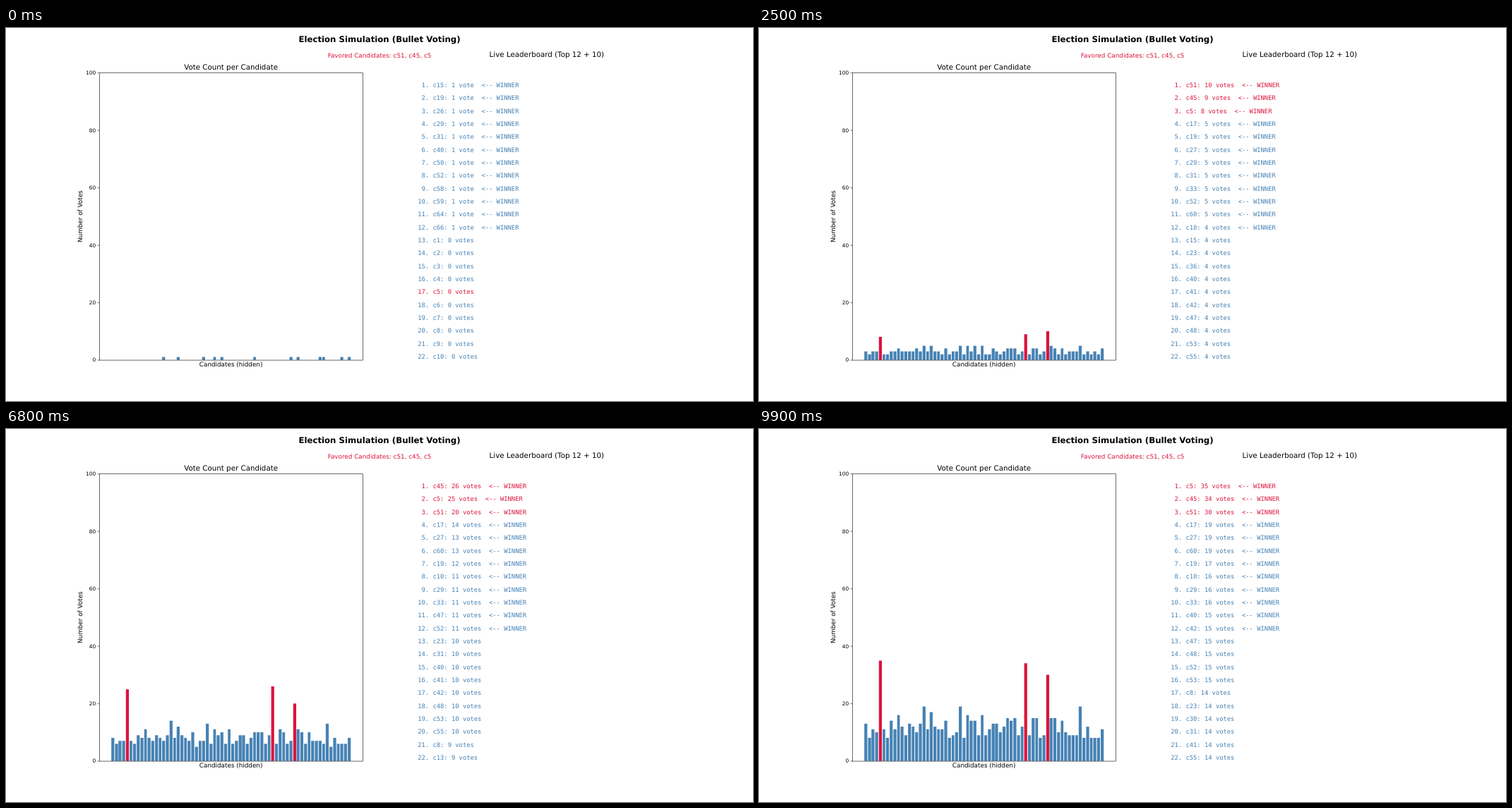
These frames come from a looping animation (1058x529 px, 10 s). An HTML page with a canvas:

```html
<!DOCTYPE html>
<html lang="en">
<head>
<meta charset="utf-8">
<title>Election Simulation</title>
<style>
html, body { margin: 0; width: 100%; height: 100%; overflow: hidden; background: #fff; }
canvas { display: block; width: 1058px; height: 529px; }
</style>
</head>
<body>
<canvas id="stage"></canvas>
<script>
// The figure is laid out at 2000 x 1000 and scaled to the stage
const STAGE_W = 1058, STAGE_H = 529, FIG_W = 2000, FIG_H = 1000;
const PT = 100 / 72;
const LOOP = 10000, STEP = 100, LAST = LOOP - STEP;
const BLUE = '#4682b4', RED = '#dc143c';
const SANS = '"DejaVu Sans", sans-serif', MONO = '"DejaVu Sans Mono", monospace';
const AXES = { left: 250, right: 954.55, top: 120, bottom: 890 };
const COUNT = 66, SEATS = 12, ROWS = 22;

// Favored candidates: [time, votes] key points
const favored = {
  5: [[0, 0], [1700, 5], [5600, 20], [8000, 30], [LAST, 35]],
  45: [[0, 0], [1700, 6], [5600, 21], [8000, 31], [LAST, 34]],
  51: [[0, 0], [1700, 8], [4100, 15], [8000, 23], [LAST, 30]]
};
// Final total: candidates who reach it
const leaders = {
  19: [17, 27, 60],
  17: [19],
  16: [10, 29, 33],
  15: [40, 42, 47, 48, 52, 53],
  14: [8, 23, 30, 31, 41, 55]
};
const early = [15, 19, 26, 29, 31, 40, 50, 52, 58, 59, 64, 66];

const canvas = document.getElementById('stage');
const ctx = canvas.getContext('2d');
const ratio = window.devicePixelRatio || 1;
canvas.width = STAGE_W * ratio;
canvas.height = STAGE_H * ratio;

const random = seed => {
  const x = Math.sin(seed * 12.9898) * 43758.5453;
  return x - Math.floor(x);
};
const colorOf = id => id in favored ? RED : BLUE;
const yOf = votes => AXES.bottom - votes / 100 * (AXES.bottom - AXES.top);

function finalVotes(id) {
  const total = Object.keys(leaders).find(t => leaders[t].includes(id));
  return total ? Number(total) : 8 + Math.floor(random(id) * 6);
}

const candidates = Array.from({ length: COUNT }, (_, i) => {
  const id = i + 1;
  const points = favored[id] || [[0, early.includes(id) ? 1 : 0], [LAST, finalVotes(id)]];
  return { id, points, phase: (i * 0.618) % 0.99 };
});

// Whole votes along the key points; the phase staggers their arrival
function votesAt({ points, phase }, time) {
  const k = Math.max(1, points.findIndex(p => p[0] >= time));
  const [t0, v0] = points[k - 1], [t1, v1] = points[k];
  return v0 + Math.floor((v1 - v0) * (time - t0) / (t1 - t0) + phase);
}

function text(str, x, y, { size = 12, family = SANS, color = '#000', align = 'center', weight = '' } = {}) {
  ctx.font = `${weight} ${size * PT}px ${family}`;
  ctx.textAlign = align;
  ctx.fillStyle = color;
  ctx.fillText(str, x, y);
}

function drawBars(tally) {
  const unit = (AXES.right - AXES.left) / ((COUNT - 0.2) * 1.1);
  const start = AXES.left + (COUNT - 0.2) * 0.05 * unit;
  for (const { id, votes } of tally) {
    const x = start + (id - 1) * unit;
    const left = Math.round(x), right = Math.round(x + 0.8 * unit);
    const top = Math.round(yOf(votes));
    ctx.fillStyle = colorOf(id);
    ctx.fillRect(left, top, right - left, AXES.bottom - top);
  }
}

function drawAxes() {
  const midX = (AXES.left + AXES.right) / 2, midY = (AXES.top + AXES.bottom) / 2;
  ctx.strokeStyle = '#000';
  ctx.lineWidth = 0.8 * PT;
  ctx.strokeRect(AXES.left + 0.5, AXES.top + 0.5,
    Math.round(AXES.right - AXES.left), AXES.bottom - AXES.top);
  for (let v = 0; v <= 100; v += 20) {
    const y = yOf(v);
    ctx.beginPath();
    ctx.moveTo(AXES.left - 3.5 * PT, y + 0.5);
    ctx.lineTo(AXES.left, y + 0.5);
    ctx.stroke();
    text(String(v), AXES.left - 7 * PT, y + 5, { size: 10, align: 'right' });
  }
  text('Vote Count per Candidate', midX, 112, { size: 14 });
  text('Candidates (hidden)', midX, 908);
  ctx.save();
  ctx.translate(204, midY);
  ctx.rotate(-Math.PI / 2);
  text('Number of Votes', 0, 0);
  ctx.restore();
}

function drawBoard(tally) {
  text('Live Leaderboard (Top 12 + 10)', 1447.7, 78, { size: 14 });
  const ranked = [...tally].sort((a, b) => b.votes - a.votes || a.id - b.id);
  ranked.slice(0, ROWS).forEach(({ id, votes }, i) => {
    const rank = String(i + 1).padStart(2, '\u00a0');
    const unit = votes === 1 ? 'vote' : 'votes';
    const mark = i < SEATS ? '\u00a0 <-- WINNER' : '';
    text(`${rank}. c${id}: ${votes} ${unit}${mark}`, 1102.5, Math.round(158.5 + i * 34.65),
      { family: MONO, color: colorOf(id), align: 'left' });
  });
}

function draw(now) {
  const time = Math.floor((now % LOOP) / STEP) * STEP;
  const tally = candidates.map(c => ({ id: c.id, votes: votesAt(c, time) }));
  ctx.setTransform(canvas.width / FIG_W, 0, 0, canvas.height / FIG_H, 0, 0);
  ctx.textRendering = 'geometricPrecision';
  ctx.fillStyle = '#fff';
  ctx.fillRect(0, 0, FIG_W, FIG_H);
  text('Election Simulation (Bullet Voting)', FIG_W / 2, 37, { size: 16, weight: 'bold' });
  text('Favored Candidates: c51, c45, c5', FIG_W / 2, 80, { color: RED });
  drawBars(tally);
  drawAxes();
  drawBoard(tally);
}

const origin = performance.now();
function loop() {
  draw(performance.now() - origin);
  requestAnimationFrame(loop);
}
loop();
</script>
</body>
</html>
```
